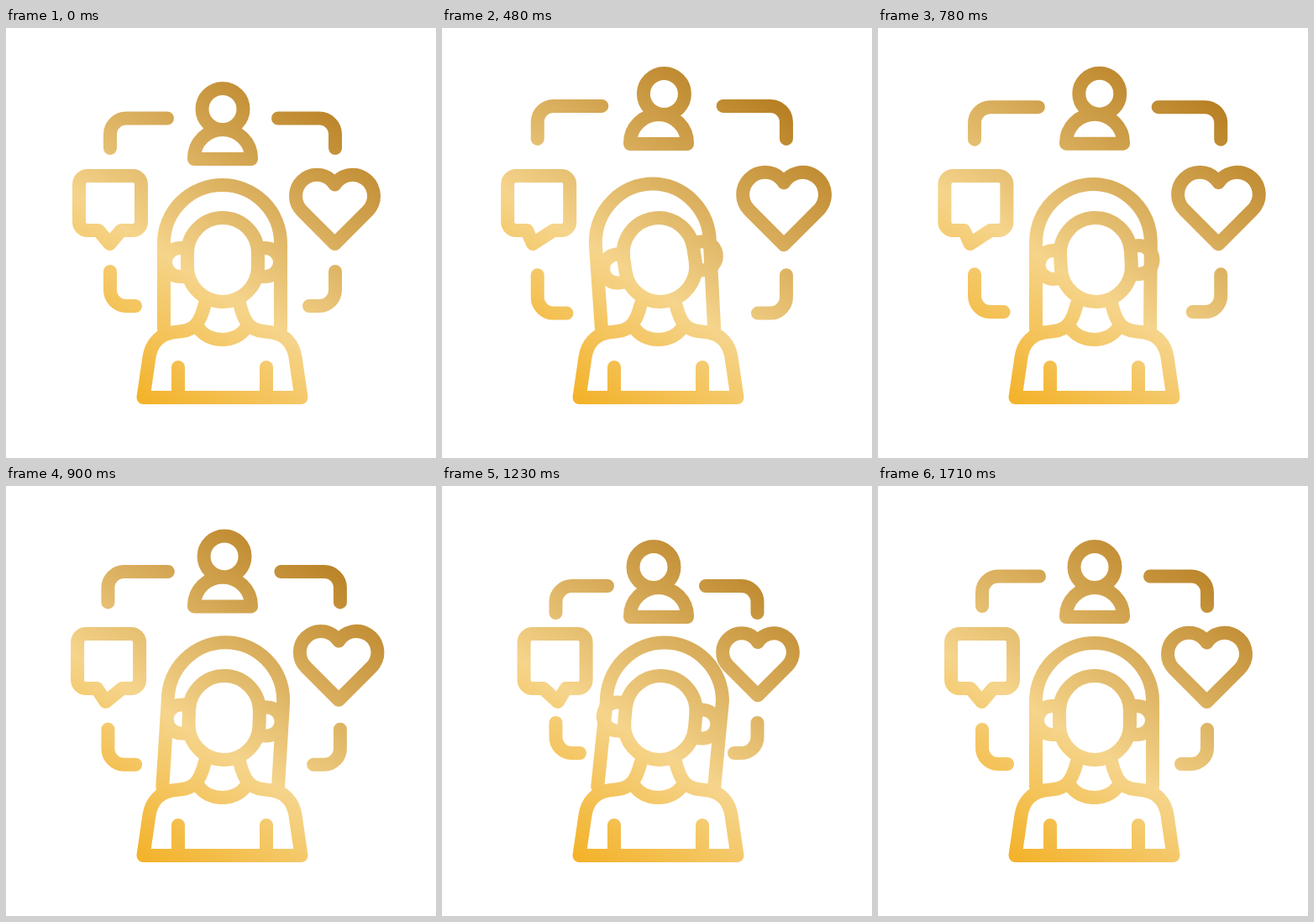
Animation, 512 px wide and 512 px high, one loop 1800 ms. Source, as an HTML page with a canvas:

```html
<!DOCTYPE html>
<html lang="en">
<head>
<meta charset="utf-8">
<title>Audience icon</title>
<style>
  html, body { margin: 0; width: 100%; height: 100%; overflow: hidden; background: #fff; }
  canvas { display: block; width: 100vw; height: 100vh; }
</style>
</head>
<body>
<canvas id="stage" width="512" height="512"></canvas>
<script>
const ctx = document.getElementById('stage').getContext('2d');
const LOOP = 1800;
const MID = 257.5;

// The head leads the swing; the surrounding symbols follow a little later.
const HEAD_KEYS = [60, 550, 545, 1090, 1130, 1720];
const SYMBOL_KEYS = [90, 610, 645, 1230, 1230, 1720];

const gold = ctx.createLinearGradient(140, 431, 373, 72.5);
gold.addColorStop(0, '#f3b229');
gold.addColorStop(0.38, '#f5d48b');
gold.addColorStop(1, '#b88024');

const shoulder = new Path2D(
  'M257.5 440 H163.5 L170.5 392 C173 376 183 365 198 362.5 L210 361 C224 359 231 352 237 328 M205 404 V436');
const neckline = new Path2D('M229 357 C241 375.5 274 375.5 286 357');
const ear = new Path2D('M-42 -14 H-51 A17 17 0 0 0 -51 20 H-42');

function ease(t, from, to) {
  const x = Math.min(1, Math.max(0, (t - from) / (to - from)));
  return (1 - Math.cos(Math.PI * x)) / 2;
}

// Returns a mixer: rest value plus offsets for the left and right poses.
function poser(t, [a, b, c, d, e, f]) {
  const turn = ease(t, c, d);
  const left = ease(t, a, b) * (1 - turn);
  const right = turn * (1 - ease(t, e, f));
  return (rest, atLeft, atRight) => rest + atLeft * left + atRight * right;
}

function stroke(draw) {
  ctx.beginPath();
  draw();
  ctx.stroke();
}

function mirrored(axis, draw) {
  draw();
  ctx.save();
  ctx.translate(2 * axis, 0);
  ctx.scale(-1, 1);
  draw();
  ctx.restore();
}

function drawBody() {
  mirrored(MID, () => ctx.stroke(shoulder));
  ctx.stroke(neckline);
}

function drawHead(pose) {
  const left = pose(188, -5.5, 8.5), right = pose(327, -8.5, 7.5);
  const radius = (right - left) / 2;
  stroke(() => {
    ctx.moveTo(pose(188, 2, -3), 358);
    ctx.lineTo(left, 256);
    ctx.ellipse(left + radius, 256, radius, pose(69, 1.5, 0.5), 0, Math.PI, 2 * Math.PI);
    ctx.lineTo(pose(327, -3, -3), 358);
  });

  ctx.save();
  ctx.translate(pose(258, 1, 2), 276);
  ctx.rotate(pose(0, -9, 5.5) * Math.PI / 180);
  stroke(() => ctx.roundRect(-42, -50, 84, 100, 42));
  mirrored(0, () => ctx.stroke(ear));
  ctx.restore();
}

function drawBracket(x, y, endX, endY) {
  stroke(() => {
    ctx.moveTo(x, endY);
    ctx.arcTo(x, y, endX, y, 19);
    ctx.lineTo(endX, y);
  });
}

function drawFrame(pose) {
  const left = pose(124, -12, 11.5), right = pose(392, 21, -16.5);
  const top = pose(107.5, -17, 11.5), bottom = pose(331, 10, -13);
  const topEnd = pose(143, -13, 8), bottomEnd = pose(290, 5, -8);
  drawBracket(left, top, pose(192, -2, 5), topEnd);
  drawBracket(right, top, pose(324, 12.5, -10), topEnd);
  drawBracket(left, bottom, pose(154, -6.5, 10), bottomEnd);
  drawBracket(right, bottom, pose(361, 17.5, -13), bottomEnd);
}

function drawPerson(pose) {
  const lift = pose(0, -21, 0);
  stroke(() => ctx.arc(pose(258, 7.5, -6), 96.5 + lift, 24.5, 0, 2 * Math.PI));
  stroke(() => {
    ctx.arc(258, 155 + lift, 34, Math.PI, 2 * Math.PI);
    ctx.lineTo(292, 156 + lift);
    ctx.lineTo(224, 156 + lift);
    ctx.closePath();
  });
}

function drawBubble(pose) {
  const x = pose(124, -10.3, 10.6);
  const l = x - 37, r = x + 37, t = 176, b = 241;
  stroke(() => {
    ctx.moveTo(x, t);
    ctx.arcTo(r, t, r, b, 10);
    ctx.arcTo(r, b, x, b, 10);
    ctx.lineTo(pose(137, -5, 10.6), b);
    ctx.lineTo(pose(123.5, -18, 14.5), 257);
    ctx.lineTo(x - 14, b);
    ctx.arcTo(l, b, l, t, 10);
    ctx.arcTo(l, t, x, t, 10);
    ctx.closePath();
  });
}

function drawHeart(pose) {
  const x = pose(391.5, 18.2, -15.5), y = pose(200, -2, -2), size = pose(1, 0.06, -0.1);
  const lobe = 21.3 * size, radius = 25.2 * size;
  const notch = Math.acos(lobe / radius);
  stroke(() => {
    ctx.moveTo(x, y + 57 * size);
    ctx.arc(x - lobe, y, radius, 0.75 * Math.PI, 2 * Math.PI - notch);
    ctx.arc(x + lobe, y, radius, Math.PI + notch, 2.25 * Math.PI);
    ctx.closePath();
  });
}

function render(now) {
  const t = now % LOOP;
  const symbolPose = poser(t, SYMBOL_KEYS);

  ctx.globalCompositeOperation = 'source-over';
  ctx.clearRect(0, 0, 512, 512);
  ctx.lineWidth = 16;
  ctx.lineCap = ctx.lineJoin = 'round';
  drawBody();
  drawHead(poser(t, HEAD_KEYS));
  [drawFrame, drawPerson, drawBubble, drawHeart].forEach(draw => draw(symbolPose));

  // One gradient, fixed to the stage, tints every line.
  ctx.globalCompositeOperation = 'source-in';
  ctx.fillStyle = gold;
  ctx.fillRect(0, 0, 512, 512);
}

const start = performance.now();
function tick() {
  render(performance.now() - start);
  requestAnimationFrame(tick);
}
tick();
</script>
</body>
</html>
```
